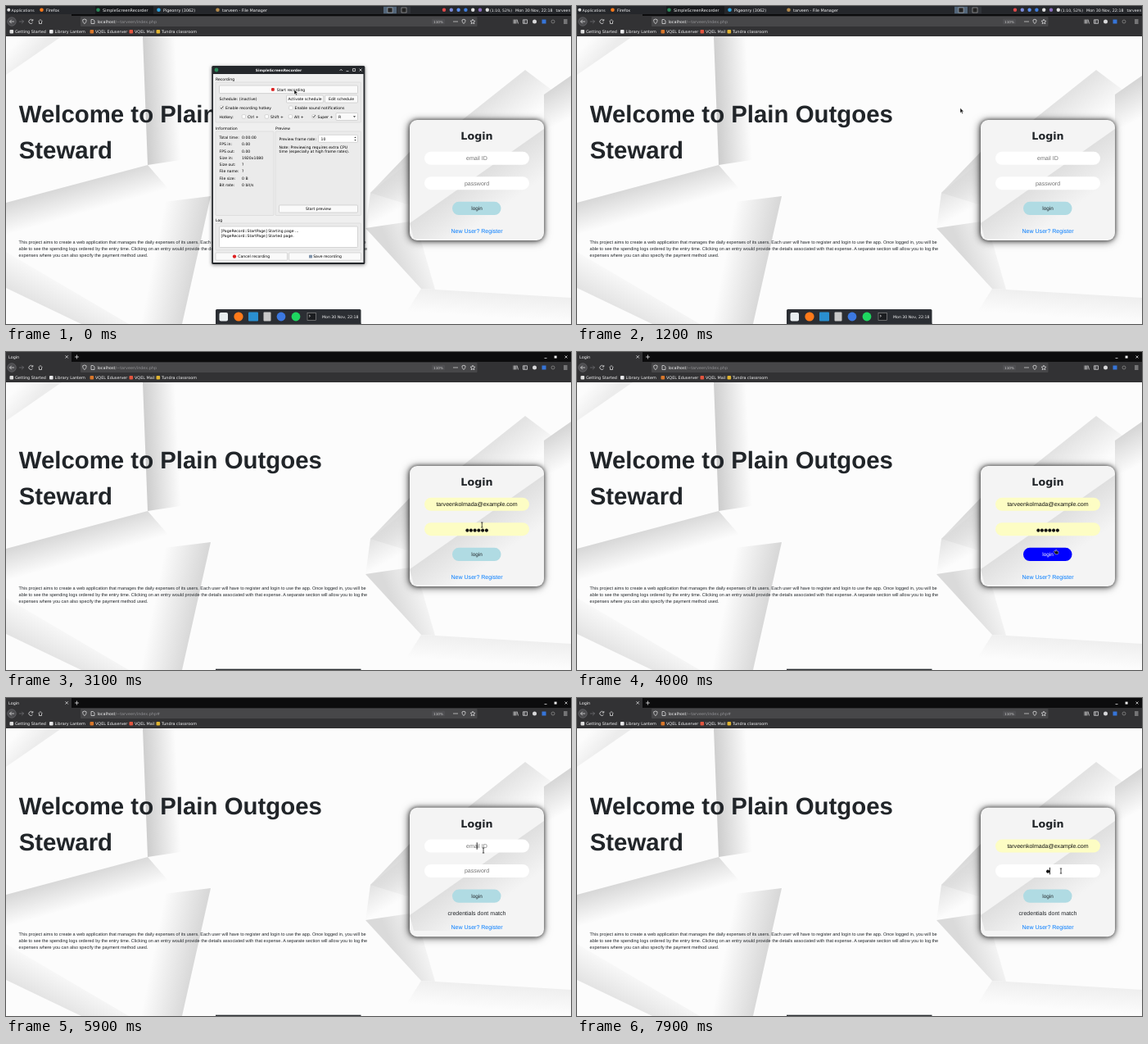
Animation, 690 px wide and 388 px high, one loop 8 s. Source, as an HTML page:

```html
<!DOCTYPE html>
<html lang="en">
<head>
<meta charset="utf-8">
<title>Login</title>
<style>
  html, body { margin: 0; width: 100%; height: 100%; overflow: hidden; background: #fcfcfc; }
  svg { display: block; width: 100vw; height: 100vh; text-rendering: geometricPrecision;
        font: 4.9px "DejaVu Sans", sans-serif; white-space: pre; }
  .sans { font-family: "Liberation Sans", Arial, sans-serif; }
  .form { font-size: 7.05px; text-anchor: middle; fill: #212529; }
  .mid { text-anchor: middle; }
  .light { fill: #f4f4f5; }
  .line { fill: none; stroke: #d8d8da; stroke-width: .8; }
  #ssr { font-size: 4.62px; }
  #box { filter: drop-shadow(0 0 2.5px rgba(0,0,0,.6)) drop-shadow(-1px 1px 5px rgba(0,0,0,.6)); }
</style>
</head>
<body>
<svg id="stage" viewBox="0 0 690 388"></svg>
<script>
const text = (x, y, s, attrs = '') => `<text x="${x}" y="${y}" ${attrs}>${s}</text>`;
const rect = (x, y, w, h, fill, attrs = '') =>
  `<rect x="${x}" y="${y}" width="${w}" height="${h}" fill="${fill}" ${attrs}/>`;
const dot = (x, y, r, fill, attrs = '') => `<circle cx="${x}" cy="${y}" r="${r}" fill="${fill}" ${attrs}/>`;
const path = (d, attrs = 'class="line"') => `<path d="${d}" ${attrs}/>`;
const group = (id, ...parts) => `<g id="${id}">${parts.join('')}</g>`;

// Folded paper: outline, gradient axis, shade at the fold
const sheets = [
  ['0,37 68,37 0,84', [34, 60, 14, 42], '#ececec'],
  ['167,37 225,37 232,185 173,194', [170, 110, 210, 108], '#cecece'],
  ['0,240 173,194 200,225 0,285', [86, 217, 96, 252], '#d8d8d8'],
  ['0,300 0,344 92,388 150,388', [46, 366, 66, 328], '#e4e4e4'],
  ['250,232 215,388 145,388 185,240', [232, 310, 182, 300], '#d8d8d8'],
  ['634,78 445,228 500,245 690,120', [540, 153, 568, 190], '#e3e3e3'],
  ['690,85 690,150 657,175 657,108', [672, 97, 692, 135], '#d6d6d6'],
  ['493,178 493,285 439,272 445,228', [462, 205, 485, 245], '#d9d9d9'],
  ['439,271 500,262 524,346 507,345', [473, 308, 520, 290], '#dadada'],
  ['507,345 690,356 690,388 480,388', [600, 351, 598, 380], '#efefef'],
];
const gradient = (id, [x1, y1, x2, y2], shade) => `
  <linearGradient id="${id}" gradientUnits="userSpaceOnUse" x1="${x1}" y1="${y1}" x2="${x2}" y2="${y2}">
    <stop stop-color="${shade}"/><stop offset="1" stop-color="${shade}" stop-opacity="0"/></linearGradient>`;
const paper = sheets.map(([points, axis, shade], i) =>
  gradient('fold' + i, axis, shade) + `<polygon points="${points}" fill="url(#fold${i})"/>`).join('');

const intro = [
  'This project aims to create a web application that manages the daily expenses of its users. Each user will have to register and login to use the app. Once logged in, you will be',
  'able to see the spending logs ordered by the entry time. Clicking on an entry would provide the details associated with that expense. A separate section will allow you to log the',
  'expenses where you can also specify the payment method used.',
];
const heading = 'class="sans" font-size="29.4" font-weight="bold" fill="#212529"';
const page = group('page', rect(0, 37, 690, 351, '#fcfcfc'), paper,
  text(15.7, 142, 'Welcome to Plain Outgoes', heading), text(15.7, 186, 'Steward', heading),
  ...intro.map((s, i) => text(15.6, 289.7 + i * 8.2, s, 'class="sans" font-size="5.51" fill="#212529"')));

const formText = (y, s, attrs = '') => text(575, y, s, `class="sans form" ${attrs}`);
const card = group('card',
  rect(493, 139, 164, 147, '#f4f4f4', 'id="box" rx="9"'),
  gradient('band', [578, 206, 606, 246], '#dfdfdf'),
  '<polygon points="657,150 657,212 555,284 498,284 493,265" fill="url(#band)"/>',
  group('fields',
    text(575, 163, 'Login', 'class="mid" font-size="12.7" font-weight="bold" fill="#212529"'),
    rect(511, 177.8, 128, 16, '#fff', 'id="email" rx="8"'),
    rect(511, 208.2, 128, 16, '#fff', 'id="pass" rx="8"'),
    rect(561.5, 211.5, 27, 9.5, '#3584e4', 'id="mark"'),
    formText(188.2, 'email ID', 'id="emailText"'), formText(218.6, 'password', 'id="passText"'),
    rect(574.7, 181.5, .9, 8.5, '#111', 'id="caret"'),
    rect(545, 238.8, 59.5, 16.2, '#b0dbe3', 'id="button" rx="8"'),
    formText(249, 'login', 'id="buttonText" style="font-size:6.4px"')),
  formText(264.6, 'credentials dont match', 'id="error"'),
  formText(277.3, 'New User? Register', 'id="link" style="fill:#007bff"'));

const bookmarks = [[11, 'Getting Started', '#ddd'], [59.5, 'Library Lantern', '#e8e8ea'],
  [109, 'VQEL Eduserver', '#d9772b'], [157, 'VQEL Mail', '#e2553f'], [190, 'Tundra classroom', '#e0b431']];
const chrome = group('chrome',
  rect(0, 0, 690, 12, '#0c0c0d'), rect(0, 0, 80, 12, '#323234'), rect(0, 12, 690, 25, '#323234'),
  text(3, 7.6, 'Login', 'class="light"'),
  path('M72.5 4.2l3.4 3.4m0-3.4l-3.4 3.4M84 6h5M86.5 3.5v5M657.5 7.5h3M682.5 4.5l3 3m0-3l-3 3'),
  rect(669.6, 4.6, 3, 3, '#eee'),
  dot(7, 19, 5.3, '#4c4c4f', 'stroke="#77777a" stroke-width=".5"'),
  path('M10 19H4.5m2.3-2.3L4.5 19l2.3 2.3M32.4 17.5a2.5 2.5 0 1 0 .2 2.6M32.8 16v2h-2M39.5 19l2.5-2.5 2.5 2.5M40.5 19v2.5h3V19'),
  path('M16 19h5.5m-2.3-2.3l2.3 2.3-2.3 2.3', 'class="line" opacity=".35"'),
  rect(91, 13, 484.5, 12, '#474749', 'rx="1"'),
  path('M93.7 16.8l2.2-.8 2.2.8c0 2.4-.6 3.8-2.2 4.8-1.6-1-2.2-2.4-2.2-4.8z M104 16.5h2.5l1.5 1.5v3.5h-4z'),
  text(111.5, 20.8, '', 'id="url" fill="#8f8f92"'),
  rect(520, 15.7, 16, 6.6, '#4f4f52', 'rx="1"'), text(528, 20.6, '110%', 'class="mid" fill="#ccc" font-size="4.2"'),
  [547, 549, 551].map(x => dot(x, 19, .65, '#ddd')).join(''),
  path('M557 17l2-.8 2 .8c0 2.3-.6 3.6-2 4.5-1.4-.9-2-2.2-2-4.5z M570 16.2l.9 1.8 2 .3-1.5 1.4.4 2-1.8-1-1.8 1 .4-2-1.5-1.4 2-.3z M620 16.5v5m1.5-5v5m1.5-5v5m1-5l1.5 5M631.5 16.8h5v4.5h-5zM633.3 17v4M681 17h4.5m-4.5 2h4.5m-4.5 2h4.5'),
  dot(645.5, 19, 2.5, '#d8d8da'), rect(654.5, 16.5, 5, 5, '#3675d8'), dot(668, 19, 2, 'none', 'stroke="#888" stroke-width=".8"'),
  bookmarks.map(([x, s, c]) => rect(x - 6.5, 28.9, 4.6, 4.6, c, 'rx="1"') + text(x, 32.9, s, 'class="light"')).join(''));

const tasks = [[41, 'Firefox', '#ff7a1a'], [110, 'SimpleScreenRecorder', '#2b8a5a'],
  [184, 'Pigeonry (3062)', '#2ca5e0'], [256, 'tarveen - File Manager', '#b58a4a']];
const tray = ['#e04a4a', '#7b8bdb', '#5b8ff0', '#3f7fe0', '#ddd', '#8b6fc0', '#ddd'];
const panel = group('panel', rect(0, 0, 690, 10, '#25272b'), rect(109, 0, 71, 10, '#17191c'),
  dot(3.3, 4.8, 2, '#ddd'), text(6.6, 6.6, 'Applications', 'class="light" font-size="4.6"'),
  tasks.map(([x, s, c]) => dot(x + 2.5, 4.8, 2.3, c) + text(x + 8, 6.6, s, 'class="light"')).join(''),
  rect(461, .8, 16, 8.4, '#53667a'), rect(478, .8, 16, 8.4, '#303338'),
  rect(466, 2, 6, 6, '#222', 'stroke="#ccc" stroke-width=".5"'), rect(483, 2, 6, 6, '#222', 'stroke="#ccc" stroke-width=".5"'),
  tray.map((c, i) => dot(535 + i * 8.8, 4.8, 2.2, c)).join(''),
  text(591, 6.6, '(1:10, 52%)', 'class="light" font-size="4.6"'),
  text(622, 6.6, 'Mon 30 Nov, 22:18', 'class="light" font-size="4.8"'),
  text(671.5, 6.6, 'tarveen', 'class="light" font-size="4.6"'));

const dock = group('dock', rect(256, 370, 177.5, 19, '#2b2e33', 'rx="1.5"'),
  rect(260.5, 374, 10.5, 10.5, '#e9eef0', 'rx="2"'), dot(284, 379, 5.6, '#ff7a1a'),
  rect(296, 373.5, 12, 11, '#2a8fd0', 'rx="1"'), rect(314.5, 373.5, 9, 11, '#c9c9c9', 'rx="1"'),
  dot(336, 379, 5.4, '#3c78e0'), dot(354, 379, 5.4, '#1ed760'),
  rect(368, 374.5, 10.5, 9, '#1b1d20', 'stroke="#999" stroke-width=".6"'), path('M370 377l1.5 1.2-1.5 1.2'),
  text(386, 381, 'Mon 30 Nov, 22:18', 'class="light" font-size="4.7"'));

const edge = 'stroke="#b4b4b4" stroke-width=".5" rx="1"';
const frame = (x, y, w, h) => rect(x, y, w, h, '#ebebeb', 'stroke="#cfcfcf" stroke-width=".5" rx="1"');
const button = (x, y, w, h, s, iconRoom = 0, attrs = '') => rect(x, y, w, h, '#fafafa', edge) +
  text(x + w / 2 + iconRoom, y + h / 2 + 1.7, s, `class="mid" ${attrs}`);
const check = (x, y, s, on) => rect(x - 6.8, y - 4, 4.4, 4.4, '#fff', edge) +
  (on ? path(`M${x - 5.9} ${y - 2}l1.1 1.4 2-3`, 'fill="none" stroke="#222" stroke-width=".8"') : '') + text(x, y, s);
const labels = ['Total time:', 'FPS in:', 'FPS out:', 'Size in:', 'Size out:', 'File name:', 'File size:', 'Bit rate:'];
const idle = ['0:00:00', '0.00', '0.00', '1920x1080', '?', '?', '0 B', '0 bit/s'];
const active = ['0:00:01', '31.64', '0.00', '1920x1080', '1920x1080', 'ui-(2).mp4', '94 KiB', '0 bit/s'];
const column = (x, y, step, list) => list.map((s, i) => text(x, y + i * step, s)).join('');
const ssr = group('ssr',
  rect(251.3, 73, 187, 242, '#24272b', 'rx="1.5" style="filter:drop-shadow(0 1px 2px rgba(0,0,0,.5))"'),
  rect(253, 83, 183.5, 230, '#efefef'), dot(257, 78, 2.4, '#2b8a5a'),
  text(333, 79.8, 'SimpleScreenRecorder', 'class="mid light" font-size="4.4" font-weight="bold"'),
  path('M407.5 79l1.7-1.8 1.7 1.8M415.5 79.5h3M423.5 76.5h3v3h-3zM431.5 76.5l3 3m0-3l-3 3'),
  text(256, 91.2, 'Recording'), frame(256, 93, 177.5, 49),
  button(260.5, 97, 169, 9.6, 'Start recording', 3, 'id="record"'),
  rect(324, 99.9, 3.8, 3.8, '#d22', 'id="recordIcon" rx="1"'),
  path('M324 100v3.8m2.2-3.8v3.8', 'id="pauseIcon" stroke="#999" stroke-width="1"'),
  text(260.5, 115.2, 'Schedule: (inactive)'),
  button(342.5, 109, 45, 9, 'Activate schedule'), button(389.5, 109, 40, 9, 'Edit schedule'),
  check(268, 126, 'Enable recording hotkey', true), check(352.5, 126, 'Enable sound notifications'),
  text(260.5, 136.7, 'Hotkey:'), check(295, 136.7, 'Ctrl +'), check(323, 136.7, 'Shift +'),
  check(352, 136.7, 'Alt +'), check(380.5, 136.7, 'Super +', true),
  rect(403, 130.5, 26.5, 9, '#fafafa', edge), text(406, 136.7, 'R'), path('M424 134.3h3l-1.5 1.8z', 'fill="#333"'),
  text(256, 151, 'Information'), frame(256, 153, 71, 102.5), column(260.5, 162.2, 8.25, labels),
  text(329, 151, 'Preview'), frame(329, 153, 104.5, 102.5),
  text(333.5, 163.7, 'Preview frame rate:'), rect(381.5, 157.3, 48, 9, '#fff', edge), text(384.5, 163.5, '10'),
  path('M425.3 161l1.2-1.6 1.2 1.6zM425.3 163l1.2 1.6 1.2-1.6z', 'fill="#333"'),
  text(333.5, 173.5, 'Note: Previewing requires extra CPU'), text(333.5, 179.1, 'time (especially at high frame rates).'),
  button(333.5, 243, 96, 9, 'Start preview'),
  text(256, 263, 'Log'), frame(256, 265, 177.5, 33), rect(260.5, 269, 169, 25.5, '#fff', edge),
  group('idle', column(288, 162.2, 8.25, idle),
    column(262.5, 276, 6.1, ['[PageRecord::StartPage] Starting page ...', '[PageRecord::StartPage] Started page.'])),
  group('active', column(288, 162.2, 8.25, active),
    column(262.5, 273, 6.1, ['[PageRecord::StartInput] Starting input ...', '[X11Input::Init] Using X11 shared memory.',
      '[PageRecord::StartInput] Started input.', '[X11Input::InputThread] Input thread started.']),
    rect(424.5, 269.4, 4.6, 24.7, '#e2e2e2'), rect(425, 279, 3.6, 11.5, '#fafafa', edge),
    path('M425.6 273l1.2-1.6 1.2 1.6zM425.6 291.6l1.2 1.6 1.2-1.6z', 'fill="#333"')),
  button(256, 301, 87.5, 9.2, 'Cancel recording', 3), dot(279, 305.6, 2.2, '#d22'),
  button(345.5, 301, 88, 9.2, 'Save recording', 3), rect(370, 303.7, 4, 3.8, '#7f93ab', 'rx=".6"'));

const cursor = group('cursor',
  path('M0 0v6l1.4-1.3 1 2.2 1-.5-1-2.1h1.9z', 'id="arrow" fill="#111" stroke="#fff" stroke-width=".4"'),
  path('M-1.2-3h2.4M0-3v6M-1.2 3h2.4', 'id="beam" stroke="#222" stroke-width=".8"'),
  path('M-2-1.6l1.7 1v-2.2q.5-.6 1 0v1.6l2.2.6v2.2l-.8 1.2h-2.6l-2.2-3z', 'id="hand" fill="#111" stroke="#fff" stroke-width=".4"'));

const stage = document.getElementById('stage');
stage.innerHTML = page + card + chrome + rect(256, 386.7, 177.5, 2, '#2b2e33') + ssr + panel + dock + cursor;
const el = Object.fromEntries([...stage.querySelectorAll('[id]')].map(e => [e.id, e]));
const show = (id, on) => el[id].style.display = on ? '' : 'none';
const shift = (id, x, y) => el[id].setAttribute('transform', `translate(${x} ${y})`);

// Pointer path: time, x, y
const route = [[0, 352, 102], [500, 400, 108], [600, 400, 108], [1100, 466, 123], [1300, 470, 126],
  [1500, 470, 126], [1800, 580, 194], [2100, 580, 194], [2400, 580, 187], [2800, 580, 187], [3500, 583, 243],
  [3700, 585, 244], [4700, 585, 244], [5200, 583, 186], [5900, 583, 186], [6600, 584, 215],
  [7000, 591, 211], [8000, 591, 211]];
function pointer(t) {
  const i = route.findIndex(p => p[0] > t), [t0, x0, y0] = route[i - 1], [t1, x1, y1] = route[i];
  const k = (t - t0) / (t1 - t0);
  return [x0 + (x1 - x0) * k, y0 + (y1 - y0) * k];
}

function field(id, value, hint, filled) {
  el[id].setAttribute('fill', filled ? '#fdfdc4' : '#fff');
  el[id + 'Text'].textContent = value || hint;
  el[id + 'Text'].style.fill = value ? '#111' : '#757575';
}

function draw(now) {
  const t = Math.floor(now % 8000 / 100) * 100;
  const recording = t >= 100, failed = t >= 4300, retyped = t >= 7900;
  show('ssr', t < 1200); show('panel', t < 1300); show('dock', t < 1300);
  show('idle', t < 1000); show('active', t >= 1000);
  show('recordIcon', !recording); show('pauseIcon', recording);
  el.record.textContent = recording ? 'Pause recording' : 'Start recording';
  el.url.innerHTML = `<tspan class="light">localhost</tspan>/~tarveen/index.php${failed ? '#' : ''}`;

  const up = failed ? -5.2 : 0;
  el.box.setAttribute('y', 139 + up);
  el.box.setAttribute('height', 147 - 2 * up);
  shift('fields', 0, up);
  shift('link', 0, -up);
  show('error', failed);

  const filled = t >= 2900 && !failed || t >= 6000;
  field('email', filled && 'tarveenkolmada@example.com', 'email ID', filled);
  field('pass', filled && (retyped ? '●' : '●●●●●●'), 'password', filled && !retyped);
  el.passText.style.fontFamily = filled ? '"DejaVu Sans", sans-serif' : '';
  el.passText.style.fontSize = filled ? '5.4px' : '';
  const marked = t >= 7200 && !retyped;
  show('mark', marked);
  if (marked) el.passText.style.fill = '#fff';
  show('caret', t >= 2400 && t < 2900 || t >= 5200 && t < 6000 || retyped);
  shift('caret', retyped ? 2.4 : 0, retyped ? 30.5 : 0);

  const [x, y] = pointer(t);
  const near = cy => x > 511 && x < 639 && Math.abs(y - cy - up) < 8;
  const beam = near(185.8) || near(216.2), hover = near(247);
  show('beam', beam); show('hand', hover); show('arrow', !beam && !hover);
  shift('cursor', x, y);
  el.button.setAttribute('fill', hover ? '#00f' : '#b0dbe3');
  el.buttonText.style.fill = hover ? '#fff' : '#212529';
}

const start = performance.now();
(function tick() {
  draw(performance.now() - start);
  requestAnimationFrame(tick);
})();
</script>
</body>
</html>
```
